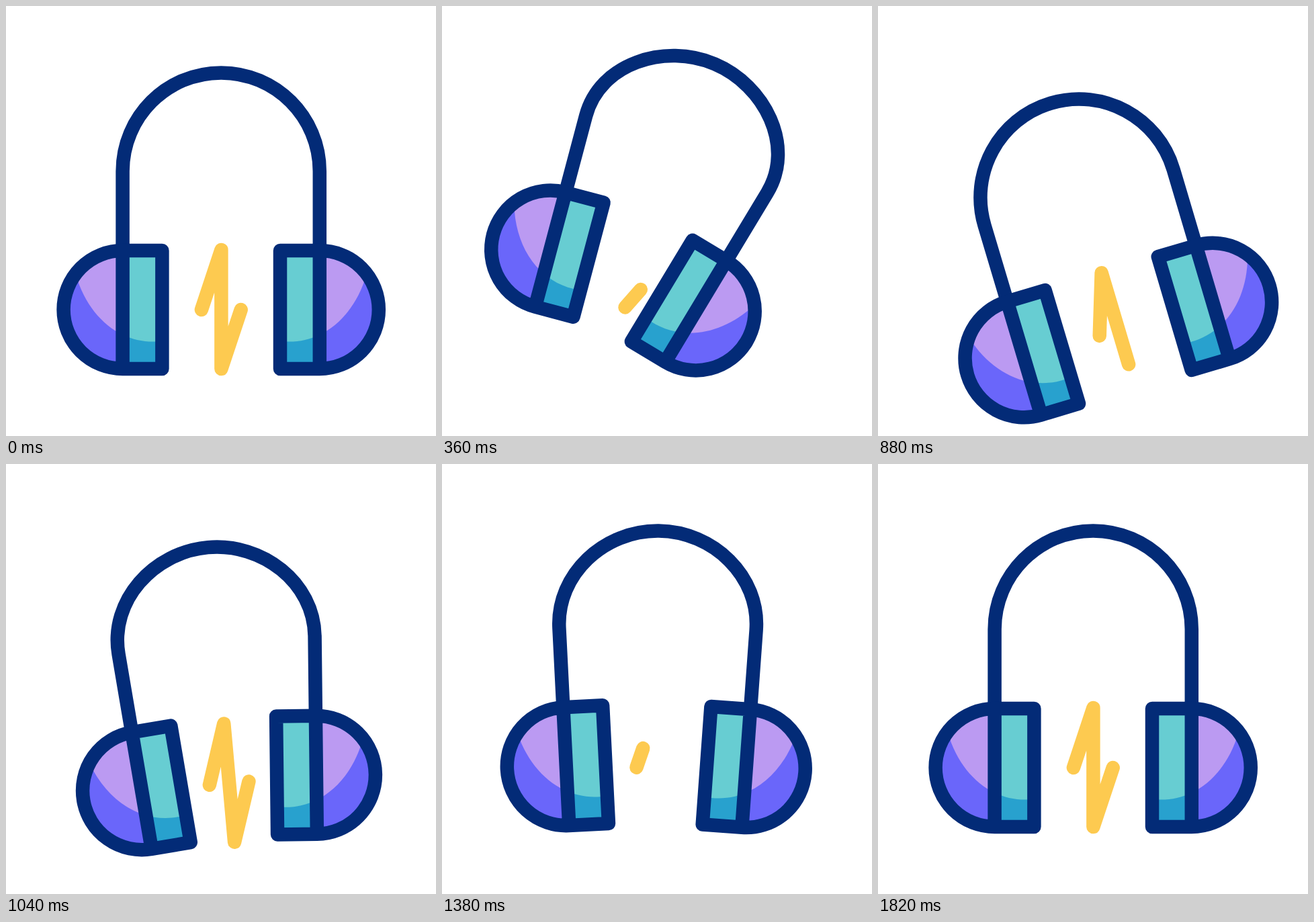
Write an HTML page that moves like this. It is 640 px wide and 640 px high and loops after 2400 ms.

```html
<!DOCTYPE html>
<html lang="en">
<head>
<meta charset="utf-8">
<title>Headphones</title>
<style>
  html, body { margin: 0; width: 100%; height: 100%; overflow: hidden; background: #fff; }
  svg { display: block; width: 100%; height: 100%; }
  .line { fill: none; stroke: #032b77; stroke-width: 20.5; stroke-linejoin: round; }
  .bolt { fill: none; stroke: #fdca50; stroke-width: 20.5; stroke-linecap: round; stroke-linejoin: round; }
</style>
</head>
<body>
<svg viewBox="0 0 640 640">
  <defs>
    <clipPath id="shell"><path d="M-146.6 44A88 88 0 0 0 -146.6 220Z"/></clipPath>
    <clipPath id="pad"><path d="M-146.6 44H-87.8V220H-146.6Z"/></clipPath>
    <path id="light" d="M-216.2 80C-198.2 142 -152.2 181 -98.2 179.5H-80V40H-216.2Z"/>
    <g id="ear">
      <g clip-path="url(#shell)">
        <rect x="-240" y="40" width="100" height="190" fill="#6a66fa"/>
        <use href="#light" fill="#bb9af2"/>
      </g>
      <g clip-path="url(#pad)">
        <rect x="-150" y="40" width="70" height="190" fill="#28a1ce"/>
        <use href="#light" fill="#67cdd2"/>
      </g>
      <path class="line" d="M-146.6 44A88 88 0 0 0 -146.6 220H-87.8V44ZV220"/>
    </g>
  </defs>
  <g id="scene">
    <path id="bolt" class="bolt" pathLength="1" d="M-29.3 132L0.2 43V220L29.5 132"/>
    <path id="band" class="line"/>
    <use id="left" href="#ear"/>
    <g transform="scale(-1 1)"><use id="right" href="#ear"/></g>
  </g>
</svg>
<script>
const LOOP = 2400, STEP = 20;
const RADIUS = 146.6, STEM_TOP = -74, STEM = 118, HANDLE = RADIUS * 0.5523;
const [scene, bolt, band, left, right] =
  ['scene', 'bolt', 'band', 'left', 'right'].map(id => document.getElementById(id));

// Keys are [time, value] pairs, eased in and out between neighbours.
const tilt = [[0, 0], [450, 25.65], [900, -16.8], [1200, 9.1], [1490, -3.4], [1820, 0]];
const lift = [[0, 0], [480, -36.9], [900, 36.5], [1250, 0]];
const squeeze = [[0, 0], [480, 9.6], [900, 0], [1200, 10], [1500, 0]];
const erase = [[[0, 0], [446, 1]], [[1045, 0], [1310, 1]]];
const draw = [[[638, 0], [1041, 1]], [[1310, 0], [1705, 1]]];

function at(keys, t) {
  if (t <= keys[0][0]) return keys[0][1];
  for (let i = 1; i < keys.length; i++) {
    const [t0, v0] = keys[i - 1], [t1, v1] = keys[i];
    if (t < t1) {
      const p = (t - t0) / (t1 - t0);
      return v0 + (v1 - v0) * p * p * (3 - 2 * p);
    }
  }
  return keys[keys.length - 1][1];
}

function boltSpan(t) {
  if (t < 638) return [at(erase[0], t), 1];
  if (t < 1045) return [0, at(draw[0], t)];
  if (t < 1310) return [at(erase[1], t), 1];
  return [0, at(draw[1], t)];
}

// Both stems turn about their top ends; the arch stays tangent to them.
function bandPath(angle) {
  const a = angle * Math.PI / 180, sin = Math.sin(a), cos = Math.cos(a);
  const top = STEM_TOP - RADIUS + 0.01 * angle * angle;
  const hx = RADIUS + HANDLE * sin, hy = STEM_TOP - HANDLE * cos;
  const endX = RADIUS - STEM * sin, endY = STEM_TOP + STEM * cos;
  return `M${-endX} ${endY}L${-RADIUS} ${STEM_TOP}` +
    `C${-hx} ${hy} ${-HANDLE} ${top} 0 ${top}` +
    `C${HANDLE} ${top} ${hx} ${hy} ${RADIUS} ${STEM_TOP}L${endX} ${endY}`;
}

function render(t) {
  const bend = at(squeeze, t);
  scene.setAttribute('transform', `translate(320.2 ${320 + at(lift, t)}) rotate(${at(tilt, t)})`);
  band.setAttribute('d', bandPath(bend));
  for (const ear of [left, right]) {
    ear.setAttribute('transform', `rotate(${-bend} ${-RADIUS} ${STEM_TOP})`);
  }
  const [start, end] = boltSpan(t), length = end - start;
  bolt.style.visibility = length > 0.001 ? 'visible' : 'hidden';
  bolt.setAttribute('stroke-dasharray', length >= 1 ? 'none' : `${length} 2`);
  bolt.setAttribute('stroke-dashoffset', -start);
}

const begin = performance.now();
function tick() {
  const t = Math.max(0, performance.now() - begin) % LOOP;
  render(Math.floor(t / STEP) * STEP);
  requestAnimationFrame(tick);
}
render(0);
requestAnimationFrame(tick);
</script>
</body>
</html>
```
